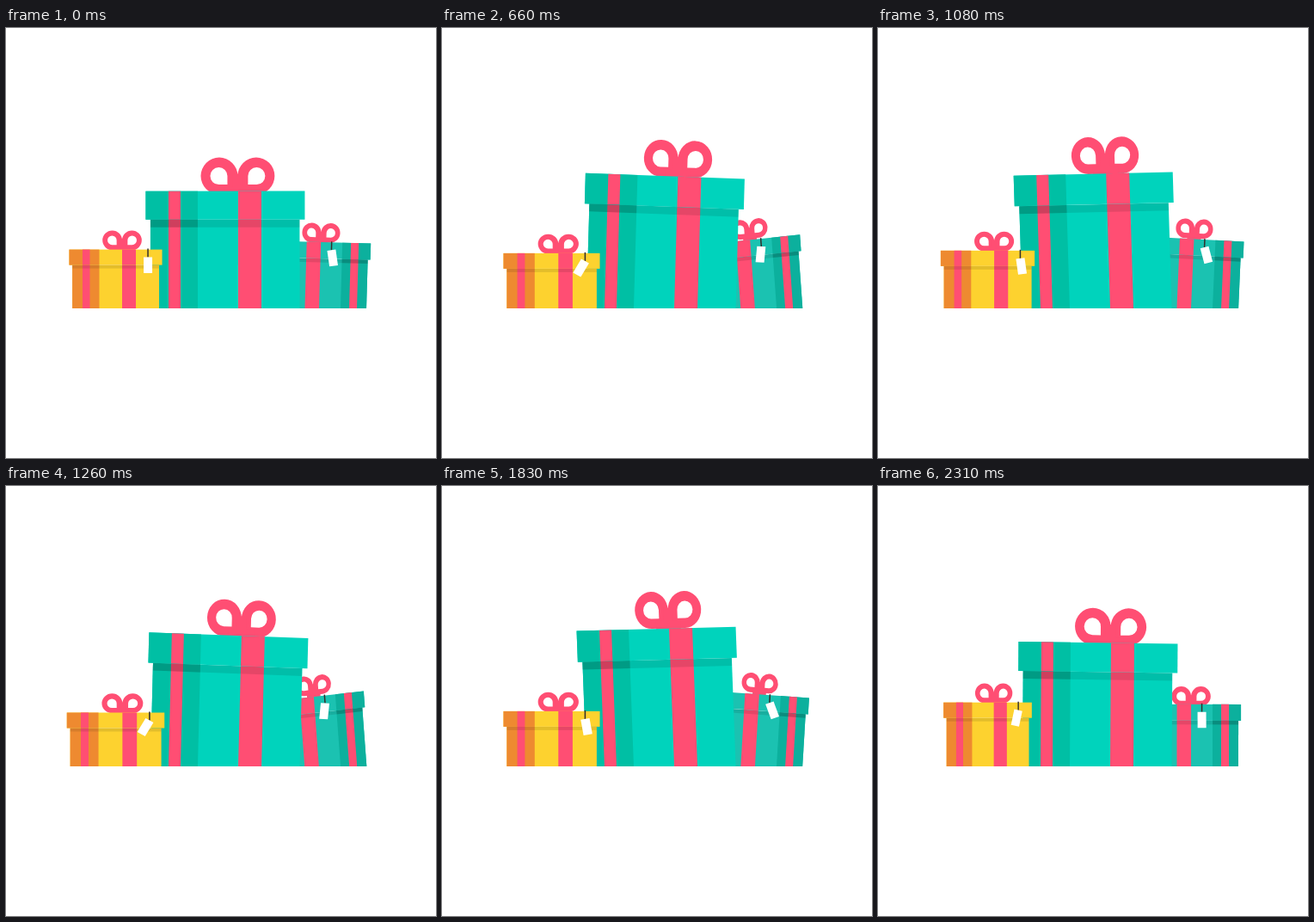
An HTML page without scripts for the animation above (2.34 s loop, 500 by 500 pixels).

```html
<!DOCTYPE html>
<html lang="en">
<head>
<meta charset="utf-8">
<title>Dancing gifts</title>
<style>
  /* --h: body height, --tilt: slope of the lid, --lean: sideways lean, --tag: tag swing */
  @property --h { syntax: "<number>"; inherits: true; initial-value: 50; }
  @property --tilt { syntax: "<angle>"; inherits: true; initial-value: 0deg; }
  @property --lean { syntax: "<angle>"; inherits: true; initial-value: 0deg; }
  @property --tag { syntax: "<angle>"; inherits: true; initial-value: 0deg; }

  html, body { margin: 0; width: 100%; height: 100%; overflow: hidden; background: #fff; }
  svg { display: block; width: 100%; height: 100%; }

  .unit rect { y: -1px; height: 1px; }
  .pink { fill: #ff4e73; }
  .shade { fill: #000; fill-opacity: .1; }
  .string { stroke: #33302c; stroke-width: 1.5; }

  .box { transform: skewY(var(--tilt)) skewX(calc(var(--lean) * -1)); }
  .body { transform: translateY(12px) scaleY(calc(var(--h) + 12)); }
  .top { transform: translateY(calc(var(--h) * -1px)); }
  .tag { transform: rotate(var(--tag)); }

  .big { animation: big 780ms linear infinite; --e: calc((var(--h) - 103) / 20); }
  .big .lid { transform: scaleY(calc(33 + 3 * var(--e))); }
  .big .bow {
    transform: translate(14.5px, calc((-33 - 7 * var(--e)) * 1px)) scaleX(calc(1 - .1 * var(--e)));
  }

  .small .lid { transform: scaleY(var(--lid)); }
  .teal { --lid: 19; animation: teal 780ms linear infinite; --e: calc((var(--h) - 53) / 11); }
  .teal .bow {
    transform: translate(-16px, calc((-19 - 4 * var(--e)) * 1px)) scale(calc(.53 - .04 * var(--e)), .53);
  }

  .yellow {
    --lid: 18;
    animation: yellow 390ms linear infinite, swing 780ms linear infinite;
    transform: scaleX(calc(1 - (var(--h) - 50.5) * .0085));
  }
  .yellow .bow { transform: translate(7.5px, -19.5px) scale(.53); }

  @keyframes big {
    0%, 50%, 100% { --h: 103; --tilt: 0deg; --lean: 0deg; }
    3.85% { --h: 112; --tilt: -.7deg; --lean: -.9deg; }
    7.69% { --h: 118; --tilt: -1.2deg; --lean: -1.5deg; }
    11.54% { --h: 122.5; --tilt: -1.55deg; --lean: -2deg; }
    25% { --h: 126; --tilt: -1.7deg; --lean: -2.3deg; }
    34.62% { --h: 124; --tilt: -1.55deg; --lean: -2.15deg; }
    42.31% { --h: 118; --tilt: -1.1deg; --lean: -1.4deg; }
    46.15% { --h: 112; --tilt: -.6deg; --lean: -.8deg; }
    53.85% { --h: 109; --tilt: .8deg; --lean: .5deg; }
    61.54% { --h: 117.2; --tilt: 2.1deg; --lean: 1.45deg; }
    67.3% { --h: 121; --tilt: 2.4deg; --lean: 1.7deg; }
    75% { --h: 122.5; --tilt: 2.5deg; --lean: 1.9deg; }
    80.77% { --h: 120.7; --tilt: 2.3deg; --lean: 1.8deg; }
    84.62% { --h: 118.7; --tilt: 2.1deg; --lean: 1.65deg; }
    96.15% { --h: 110; --tilt: .8deg; --lean: .4deg; }
  }
  @keyframes teal {
    0%, 100% { --h: 57.5; --tilt: 1.4deg; --lean: 1.6deg; --tag: -9.5deg; }
    3.85% { --h: 61.5; --tilt: 2.5deg; --lean: 2.5deg; --tag: -16deg; }
    11.54% { --h: 65.5; --tilt: 3.7deg; --lean: 3.5deg; --tag: -24.5deg; }
    25% { --h: 66; --tilt: 4.5deg; --lean: 3.8deg; --tag: -26deg; }
    34.62% { --h: 64; --tilt: 4.2deg; --lean: 3.4deg; --tag: -24deg; }
    42.31% { --h: 58; --tilt: 1.8deg; --lean: 1.6deg; --tag: -11deg; }
    46.15% { --h: 53; --tilt: 0deg; --lean: 0deg; --tag: 0deg; }
    50% { --h: 57; --tilt: -2.2deg; --lean: -1.5deg; --tag: 4deg; }
    53.85% { --h: 60.5; --tilt: -4.2deg; --lean: -2.8deg; --tag: 7deg; }
    61.54% { --h: 64.5; --tilt: -6.5deg; --lean: -4.2deg; --tag: 10deg; }
    75% { --h: 65; --tilt: -7deg; --lean: -4.5deg; --tag: 11deg; }
    84.62% { --h: 63; --tilt: -6deg; --lean: -4.1deg; --tag: 9.5deg; }
    92.31% { --h: 57.5; --tilt: -2.6deg; --lean: -1.8deg; --tag: 4deg; }
    96.15% { --h: 53; --tilt: 0deg; --lean: 0deg; --tag: 0deg; }
  }
  @keyframes yellow {
    0%, 100% { --h: 50.5; }
    7.69% { --h: 47.2; }
    23.08% { --h: 44.5; }
    38.5% { --h: 44; }
    54% { --h: 44.3; }
    69.23% { --h: 46; }
    76.92% { --h: 49; }
    84.62% { --h: 53.5; }
    90% { --h: 57.5; }
    92.31% { --h: 56.5; }
  }
  @keyframes swing {
    0%, 50%, 100% { --tag: 0deg; }
    3.85% { --tag: -5deg; }
    11.54% { --tag: -10deg; }
    25% { --tag: -11deg; }
    34.62% { --tag: -10deg; }
    46.15% { --tag: -4deg; }
    53.85% { --tag: 13deg; }
    61.54% { --tag: 30deg; }
    75% { --tag: 33deg; }
    84.62% { --tag: 30deg; }
    96.15% { --tag: 13deg; }
  }
</style>
</head>
<body>
<svg viewBox="0 0 500 500">
  <defs>
    <clipPath id="ground"><rect width="500" height="326"/></clipPath>
    <path id="loop" fill-rule="evenodd" d="M0-17.5A21.5 21.5 0 1 0-21.5 4H0ZM-12-17.5A10 10 0 1 0-22-7.5H-12Z"/>
    <g id="bow" class="pink">
      <use href="#loop"/>
      <use href="#loop" transform="scale(-1 1)"/>
      <path d="M-6-20H6V-5H16V9H-16V-5H-6Z"/>
    </g>
    <g id="label">
      <path class="string" d="M0-1V9"/>
      <g transform="translate(0 9)"><rect class="tag" x="-5" width="10" height="18.5" fill="#fff"/></g>
    </g>
    <g id="bigRibbons" class="pink unit">
      <rect x="-66" width="14"/><rect x="15" width="27"/>
    </g>
    <g id="tealRibbons" class="pink unit">
      <rect x="-32.5" width="16.5"/><rect x="19" width="9"/>
    </g>
    <g id="yellowRibbons" class="pink unit">
      <rect x="-38.5" width="8.5"/><rect x="7.5" width="16"/>
    </g>
  </defs>

  <g clip-path="url(#ground)">
    <g transform="translate(380 326)">
      <g class="box small teal">
        <g class="body unit">
          <rect x="-58" width="97" fill="#1bc2b1"/>
          <rect x="9" width="30" fill="#0cb09d"/>
          <use href="#tealRibbons"/>
        </g>
        <g class="top">
          <g class="bow"><use href="#bow"/></g>
          <g class="lid unit">
            <rect x="-62" width="104" fill="#1bc2b1"/>
            <rect x="9" width="33" fill="#0cb09d"/>
            <use href="#tealRibbons"/>
          </g>
          <rect class="shade" x="-58" width="97" height="4.5"/>
          <rect class="shade" x="9" width="30" height="4.5"/>
          <use href="#label" x="-3.5" y="-19"/>
        </g>
      </g>
    </g>

    <g transform="translate(255 326)">
      <g class="box big">
        <g class="body unit">
          <rect x="-87" width="173.5" fill="#00d3bc"/>
          <rect x="-87" width="55" fill="#00bfa4"/>
          <use href="#bigRibbons"/>
        </g>
        <g class="top">
          <g class="bow"><use href="#bow"/></g>
          <g class="lid unit">
            <rect x="-92.5" width="185" fill="#00d3bc"/>
            <rect x="-92.5" width="60.5" fill="#00bfa4"/>
            <use href="#bigRibbons"/>
          </g>
          <rect class="shade" x="-87" width="173.5" height="9"/>
          <rect class="shade" x="-87" width="55" height="9"/>
        </g>
      </g>
    </g>

    <g transform="translate(127.5 326)">
      <g class="small yellow">
        <g class="body unit">
          <rect x="-50.3" width="100.8" fill="#fdd22f"/>
          <rect x="-50.3" width="31.3" fill="#ee8a30"/>
          <use href="#yellowRibbons"/>
        </g>
        <g class="top">
          <g class="bow"><use href="#bow"/></g>
          <g class="lid unit">
            <rect x="-54" width="108" fill="#fdd22f"/>
            <rect x="-54" width="35" fill="#ee8a30"/>
            <use href="#yellowRibbons"/>
          </g>
          <rect class="shade" x="-50.3" width="100.8" height="4"/>
          <use href="#label" x="37.5" y="-18"/>
        </g>
      </g>
    </g>
  </g>
</svg>
</body>
</html>
```
